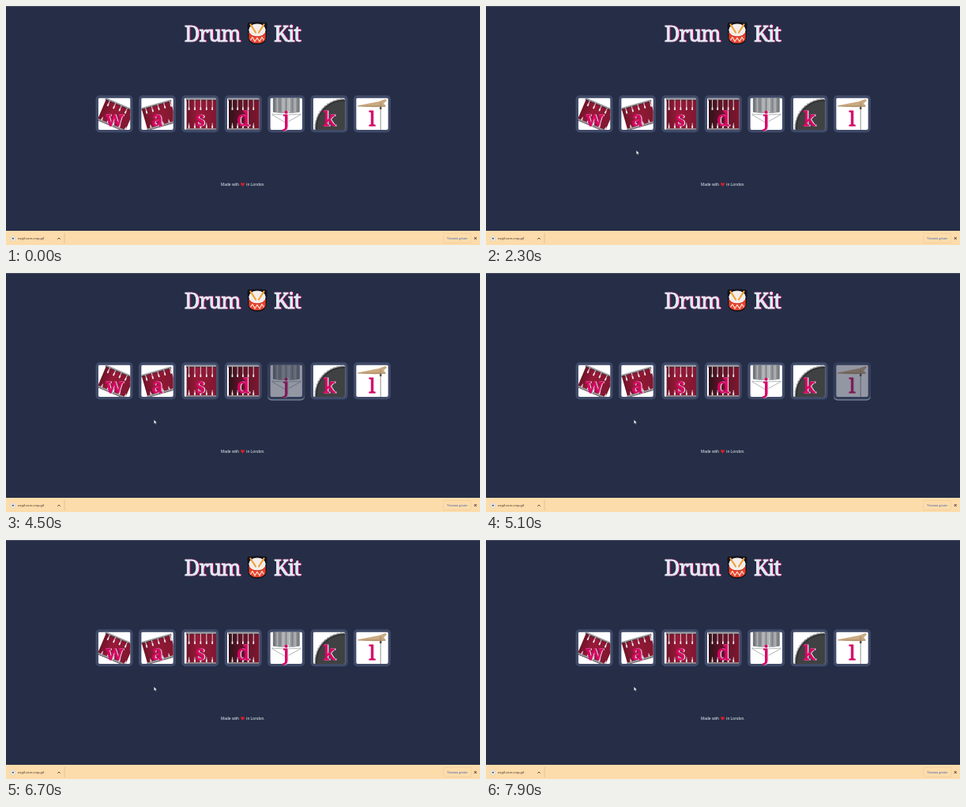
These frames come from a looping animation (600x303 px, 8000 ms). An HTML page:

```html
<!DOCTYPE html>
<html lang="en">
<head>
<meta charset="utf-8">
<title>Drum Kit</title>
<style>
  html, body { margin: 0; width: 100%; height: 100%; overflow: hidden; background: #262e47; }
  svg { display: block; width: 100vw; height: 100vh; }
  .title { font: 27px "Noto Serif", serif; letter-spacing: -1.1px; stroke-width: .9; }
  .letter { font: 26px "Noto Serif", serif; text-anchor: middle; stroke-width: .9; }
  .pale { fill: #dbedf3; stroke: #dbedf3; }
  .pink { fill: #da0463; stroke: #da0463; }
  .small { font: 5px "Liberation Sans", Arial, sans-serif; fill: #e6eff5; }
  .file { font-size: 4.2px; fill: #3a342c; }
  .link { font-size: 3.9px; fill: #3d5fae; }
  .glow { visibility: hidden; }
  .pressed .glow { visibility: visible; }
  .pressed { opacity: .5; }
</style>
</head>
<body>
<svg viewBox="0 0 600 303" xmlns="http://www.w3.org/2000/svg">
  <defs>
    <clipPath id="inner"><rect width="40.5" height="40.5" rx="2"/></clipPath>
    <filter id="soft" x="-20%" y="-20%" width="140%" height="140%"><feGaussianBlur stdDeviation=".7"/></filter>
    <linearGradient id="red">
      <stop offset="0" stop-color="#6d1429"/><stop offset=".35" stop-color="#981a38"/><stop offset="1" stop-color="#80172f"/>
    </linearGradient>
    <linearGradient id="deep">
      <stop offset="0" stop-color="#2c121a"/><stop offset=".3" stop-color="#581325"/><stop offset="1" stop-color="#7d1730"/>
    </linearGradient>
    <linearGradient id="steel">
      <stop offset="0" stop-color="#777b80"/><stop offset=".5" stop-color="#aeb0b3"/><stop offset="1" stop-color="#85888c"/>
    </linearGradient>
  </defs>

  <rect width="600" height="303" fill="#262e47"/>
  <rect width="600" height="1" fill="#454c60"/>

  <g class="title">
    <g class="pink"><text x="226.8" y="45">Drum</text><text x="340" y="45">Kit</text></g>
    <g class="pale"><text x="225.8" y="45">Drum</text><text x="339" y="45">Kit</text></g>
  </g>

  <g id="emblem">
    <path d="M305.500 25Q305 20 310 21Q318 19.500 326 21Q331 20 330.500 25L329.500 42Q327 49 318 49Q309 49 306.500 42Z" fill="#11131b"/>
    <path d="M307.500 33V41.500Q309.500 47.300 318 47.300T328.500 41.500V33Z" fill="#e8432c"/>
    <path d="M309.500 43.500L312 39.500L315 45L318 40.500L321 45L324 39.500L326.500 43.500" fill="none" stroke="#f8d9cf" stroke-width="1.3"/>
    <ellipse cx="318" cy="30.500" rx="10.700" ry="8" fill="#f3eeeb"/>
    <path d="M307.500 34Q310 39 318 39T328.500 34" fill="none" stroke="#d63a27" stroke-width="1.100"/>
    <path d="M309.500 23.500L316 33.500M326.500 23.500L320 33.500" stroke="#f0a13a" stroke-width="2.200" stroke-linecap="round"/>
  </g>

  <g id="keys"></g>

  <g class="small">
    <text x="272" y="228">Made with</text>
    <text x="304.300" y="228">in London.</text>
  </g>
  <path d="M299.500 228.700L297.200 226.400Q296.500 224.300 298 224Q299.100 223.900 299.500 224.600Q300 223.900 301 224Q302.500 224.300 301.800 226.400Z" fill="#cc1f2d"/>

  <rect y="285" width="600" height="18" fill="#fddcab"/>
  <path d="M74 288V301" stroke="#d6bb94" stroke-width=".8"/>
  <rect x="6.500" y="292" width="4.800" height="5.600" rx=".5" fill="#f8f8f6" stroke="#b8b5b0" stroke-width=".4"/>
  <circle cx="8.900" cy="294.800" r="1.300" fill="#59718f"/>
  <text class="small file" x="15" y="296.300">ezgif.com-crop.gif</text>
  <path d="M65.300 295.700L67 294L68.700 295.700" fill="none" stroke="#41392f" stroke-width=".9"/>
  <rect x="553.500" y="288.500" width="35" height="12" rx="1" fill="none" stroke="#f0cd9b" stroke-width=".7"/>
  <text class="small link" x="558" y="296">Tümünü göster</text>
  <path d="M592.700 293L595.700 296M595.700 293L592.700 296" stroke="#2f2a25" stroke-width=".9"/>

  <path id="cursor" d="M0 0V5L1.200 4L2 5.700L2.900 5.300L2.100 3.700H3.600Z" fill="#fff" stroke="#1b2030" stroke-width=".3"/>
</svg>

<script>
const LOOP = 8000, PRESS = 100;
const $ = id => document.getElementById(id);

const lugs = (x, step, n, y, len) => Array.from({ length: n }, (_, i) =>
  `<path d="M${x + i * step} ${y}v${len}" stroke="#c9c2c6" stroke-width="1.1"/>
   <path d="M${x + i * step} ${y + len - 3}v3.500" stroke="#efeaec" stroke-width="1.7"/>`).join('');

const rim = (x, y, w) =>
  `<rect x="${x}" y="${y}" width="${w}" height="1.800" fill="#99969b"/>
   <path d="M${x} ${y + 2.200}h${w}" stroke="#3b2730" stroke-width=".7"/>`;

const tom = (place, w, h) =>
  `<g transform="${place}"><rect width="${w}" height="${h}" fill="url(#red)"/>
   ${rim(-1, -1.500, w + 2)}${lugs(5, 8, 5, 0, 7)}${lugs(5, 8, 5, h - 5, 5)}${rim(-1, h - 1, w + 2)}</g>`;

const upright = (fill, x, lugX, step) =>
  `<rect x="${x}" y="2" width="39" height="39" fill="url(#${fill})"/>
   ${rim(x - 1, .500, 41)}${lugs(lugX, step, 5, 2, 13)}${lugs(lugX, step, 5, 32, 6)}
   ${rim(x - 1, 38.500, 41)}`;

const wires = Array.from({ length: 9 }, (_, i) =>
  `<path d="M${5 + i * 3.800} 0v18" stroke="${i % 2 ? '#d1d3d5' : '#666a6f'}" stroke-width=".9"/>`).join('');

const art = {
  w: tom('translate(10 1.500) rotate(23)', 38, 27.500),
  a: tom('translate(.5 14) rotate(-16)', 38, 27),
  s: upright('red', 3, 6, 7.400),
  d: upright('deep', 2, 6.500, 6.700),
  j: `<path d="M3.500 0H37.500V18Q21 21 3.500 18Z" fill="url(#steel)"/>${wires}
      <path d="M2 20.500Q20 22.500 39 20.500" fill="none" stroke="#b5b7ba" stroke-width="1"/>
      <path d="M2 21L20 31.500L39 21" fill="none" stroke="#b0b2b5" stroke-width="1"/>`,
  k: `<circle cx="39" cy="38" r="36.500" fill="#404142"/>
      <circle cx="39" cy="38" r="36.500" fill="none" stroke="#8f9193" stroke-width="1.600" stroke-dasharray="3 1.500"/>
      <circle cx="39" cy="38" r="34.700" fill="none" stroke="#2b2c2f" stroke-width="1.200"/>`,
  l: `<path d="M1 10L29 4.500L37 1.500L39 3L35 7L38 11L30 11.500Q14 12 1 10Z" fill="#cbaa80"/>
      <path d="M2 10.400Q19 10.400 37 10.500" fill="none" stroke="#9c8057" stroke-width=".8"/>
      <path d="M31 6V41" stroke="#8a867f" stroke-width=".9"/>
      <path d="M29.800 11.500h2.500v3h-2.500z" fill="#59554f"/>`
};

const names = [...'wasdjkl'];
$('keys').innerHTML = names.map((name, i) =>
  `<g transform="translate(${113.500 + i * 54.400} 113.300)">
     <rect class="glow" y="1.200" width="47" height="47" rx="5" fill="#dbedf3" filter="url(#soft)"/>
     <rect width="47" height="47" rx="5" fill="#404b69"/>
     <g transform="translate(3.300 3.300)">
       <g clip-path="url(#inner)"><rect width="41" height="41" fill="#fff"/>${art[name]}</g>
       <g class="letter">
         <text class="pale" x="21.500" y="35">${name}</text>
         <text class="pink" x="20.300" y="35">${name}</text>
       </g>
     </g>
   </g>`).join('');
const keys = [...$('keys').children];

// Key hits follow a steady beat of 300 ms.
const beat = (word, start) => [...word].map((name, i) => [name, start + i * 300]);
const hits = [...beat('djkl', 4200), ...beat('wasdjkl', 5900)];

function draw(t) {
  keys.forEach((key, i) => key.classList.toggle('pressed',
    hits.some(([name, at]) => name === names[i] && t >= at && t < at + PRESS)));

  const p = Math.min(1, Math.max(0, (t - 2400) / 800));
  const ease = p * p * (3 - 2 * p);
  $('cursor').setAttribute('transform', `translate(${190.300 - 3 * ease} ${183 + 3 * ease})`);
  $('cursor').style.visibility = t >= 2300 ? 'visible' : 'hidden';
}

const start = performance.now();
function tick() {
  draw((performance.now() - start) % LOOP);
  requestAnimationFrame(tick);
}
tick();
</script>
</body>
</html>
```
